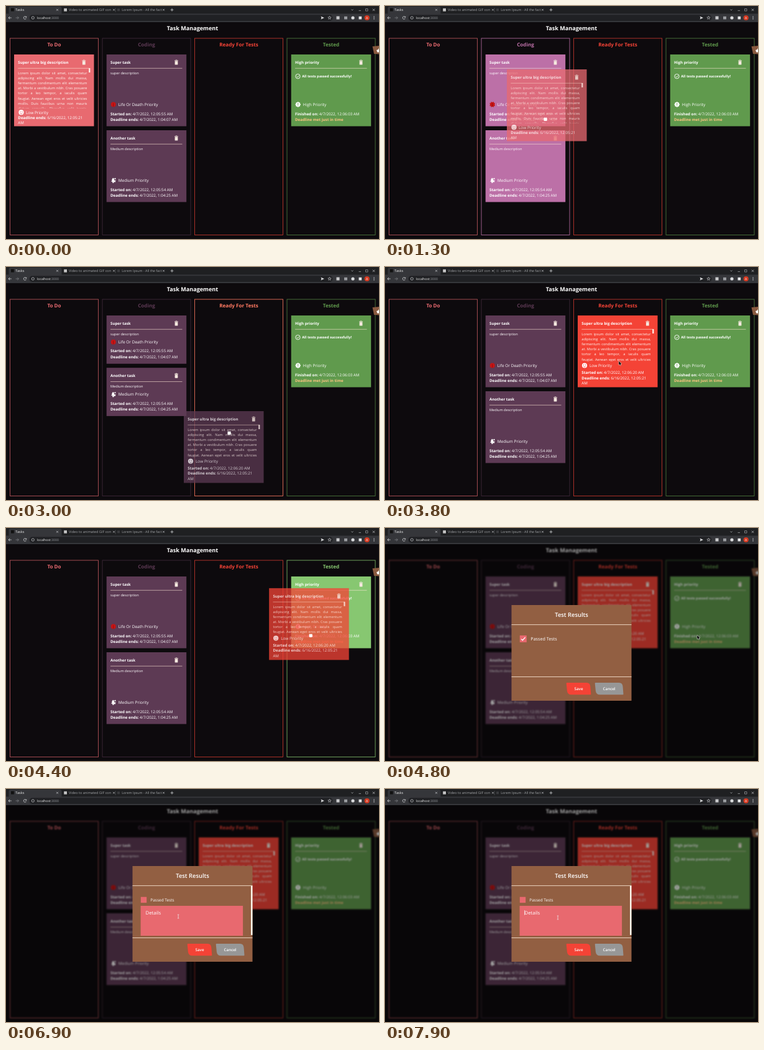
An HTML page with a canvas for the animation above (8 s loop, 600 by 375 pixels).

```html
<!DOCTYPE html>
<html lang="en">
<head>
<meta charset="utf-8">
<title>Tasks</title>
<style>
html, body { margin: 0; width: 100%; height: 100%; overflow: hidden; background: #0d0a0d; }
canvas { display: block; width: 600px; height: 375px; }
</style>
</head>
<body>
<canvas id="stage"></canvas>
<script>
const W = 600, H = 375, LOOP = 8000, BAR = 26;
const dpr = window.devicePixelRatio || 1;
const FONT = '"Open Sans", "Noto Sans", sans-serif';

function layer(canvas) {
  canvas.width = W * dpr;
  canvas.height = H * dpr;
  const c = canvas.getContext('2d');
  c.scale(dpr, dpr);
  if ('textRendering' in c) c.textRendering = 'geometricPrecision';
  return c;
}
const main = layer(document.getElementById('stage'));
const board = layer(document.createElement('canvas'));
let g = board;

const clamp = v => Math.max(0, Math.min(1, v));
const ramp = (t, a, b) => clamp((t - a) / (b - a));
const smooth = k => k * k * (3 - 2 * k);
const lerp = (a, b, k) => a + (b - a) * k;
const within = (t, a, b) => t >= a && t < b;
const mix = (a, b, k) => 'rgb(' + a.map((v, i) => Math.round(lerp(v, b[i], k))) + ')';

// Drawing helpers
function rect(x, y, w, h, color) {
  g.fillStyle = color;
  g.fillRect(x, y, w, h);
}
function text(s, x, y, size, color = '#fff', weight = 400, align = 'left') {
  g.font = `${weight} ${size}px ${FONT}`;
  g.textAlign = align;
  g.textBaseline = 'alphabetic';
  g.fillStyle = color;
  g.fillText(s, x, y);
  return g.measureText(s).width;
}
function disc(x, y, r, color) {
  g.fillStyle = color;
  g.beginPath();
  g.arc(x, y, r, 0, 7);
  g.fill();
}
function trace(pts, close) {
  g.beginPath();
  pts.forEach(([x, y], i) => i ? g.lineTo(x, y) : g.moveTo(x, y));
  if (close) g.closePath();
}
function line(pts, color, width = 0.8, close = false) {
  trace(pts, close);
  g.strokeStyle = color;
  g.lineWidth = width;
  g.stroke();
}
function poly(pts, color) {
  trace(pts, true);
  g.fillStyle = color;
  g.fill();
}
function ring(x, y, r, color, width = 0.8, from = 0, to = 7) {
  g.beginPath();
  g.arc(x, y, r, from, to);
  g.strokeStyle = color;
  g.lineWidth = width;
  g.stroke();
}
function pill(x, y, w, h, r, color) {
  g.fillStyle = color;
  g.beginPath();
  g.roundRect(x, y, w, h, r);
  g.fill();
}
function cross(x, y, r, color) {
  line([[x - r, y - r], [x + r, y + r]], color, 0.7);
  line([[x - r, y + r], [x + r, y - r]], color, 0.7);
}

// Board data
const COLUMNS = [
  { name: 'To Do', x: 6.5, base: [232, 106, 112], lit: [240, 116, 112] },
  { name: 'Coding', x: 155, base: [93, 58, 84], lit: [188, 112, 167] },
  { name: 'Ready For Tests', x: 303.5, base: [244, 67, 54], lit: [255, 122, 98] },
  { name: 'Tested', x: 452, base: [96, 154, 77], lit: [142, 207, 120] }
];
const LOREM = [
  'Lorem ipsum dolor sit amet, consectetur',
  'adipiscing elit. Nam mollis dui massa,',
  'fermentum condimentum elit elementum',
  'at. Morbi a vestibulum nibh. Cras posuere',
  'tortor a leo tempor, a iaculis quam',
  'feugiat. Aenean eget eros et velit ultricies',
  'mollis. Duis faucibus urna non mauris',
  'dictum convallis. Phasellus velit turpis,'
];
const SUPER = { title: 'Super task', desc: 'super description', level: 'Life Or Death',
  rows: [['Started on:', '4/7/2022, 12:05:55 AM'], ['Deadline ends:', '4/7/2022, 1:04:07 AM']] };
const ANOTHER = { title: 'Another task', desc: 'Medium description', level: 'Medium',
  rows: [['Started on:', '4/7/2022, 12:05:54 AM'], ['Deadline ends:', '4/7/2022, 1:04:25 AM']] };
const HIGH = { title: 'High priority', passed: true, level: 'High',
  rows: [['Finished on:', '4/7/2022, 12:06:03 AM']] };
const DUE = ['Deadline ends:', '6/16/2022, 12:05:21'];
const BIG_NEW = { title: 'Super ultra big description', long: true, level: 'Low', rows: [DUE] };
const BIG = { ...BIG_NEW, rows: [['Started on:', '4/7/2022, 12:06:20 AM'], DUE] };

function trash(x, y) {
  const c = '#f6e9df';
  rect(x - 2.9, y - 3.1, 5.8, 1.1, c);
  rect(x - 1.2, y - 4, 2.4, 1, c);
  pill(x - 2.4, y - 1.6, 4.8, 5.6, 0.7, c);
}
function badge(x, y, color) {
  g.fillStyle = color;
  g.beginPath();
  for (let i = 0; i <= 48; i++) {
    const a = i / 48 * Math.PI * 2, r = 4 + 0.35 * Math.cos(a * 8);
    g.lineTo(x + r * Math.cos(a), y + r * Math.sin(a));
  }
  g.fill();
}
function levelIcon(level, x, y, fill) {
  if (level === 'Low') {
    disc(x, y, 4.1, '#fff');
    disc(x - 1.5, y - 1, 0.7, fill);
    disc(x + 1.5, y - 1, 0.7, fill);
    ring(x, y + 0.3, 2, fill, 0.8, 0.3, 2.85);
  } else if (level === 'Medium') {
    poly([[x - 3.6, y + 2.2], [x - 2.3, y + 0.6], [x - 2.3, y - 1.6], [x - 0.6, y - 3.9],
      [x + 1.2, y - 2.4], [x + 1.3, y], [x + 3.8, y], [x + 3, y + 3.2], [x + 1, y + 2.6]], '#fff');
    disc(x - 0.3, y + 3.3, 1.2, '#fff');
    disc(x + 2.8, y - 2.6, 1.1, '#fff');
  } else if (level === 'High') {
    badge(x, y, '#fff');
    rect(x - 0.5, y - 2.3, 1, 2.9, fill);
    rect(x - 0.5, y + 1.3, 1, 1, fill);
  } else {
    for (let i = 0; i < 8; i++) {
      const a = i * Math.PI / 4 + 0.4;
      line([[x, y], [x + 4.7 * Math.cos(a), y + 4.7 * Math.sin(a)]], '#b01818', 1);
    }
    disc(x, y, 3.8, '#c81414');
    line([[x, y - 2], [x, y + 3.4]], '#6d0d12', 0.6);
  }
}
function justified(s, x, y, width, size) {
  const words = s.split(' ');
  g.font = `400 ${size}px ${FONT}`;
  const sizes = words.map(w => g.measureText(w).width);
  const gap = (width - sizes.reduce((a, b) => a + b, 0)) / (words.length - 1);
  words.forEach((w, i) => {
    text(w, x, y, size, '#fff4ee');
    x += sizes[i] + gap;
  });
}
function card(c, x, y, h, fill) {
  rect(x, y, 128.5, h, fill);
  const tx = x + 6.3;
  text(c.title, tx, y + 14.7, 6.15, '#fff', 700);
  trash(x + 112.3, y + 12.6);
  rect(tx, y + 21.8, 115.5, 0.8, 'rgba(255,232,215,.72)');

  const wraps = c.long, rows = c.rows;
  const low = wraps && rows.length === 1;
  if (c.long) {
    g.save();
    g.beginPath();
    g.rect(x, y + 23, 128, low ? 63.5 : 51);
    g.clip();
    LOREM.forEach((s, i) => justified(s, tx, y + 31.8 + i * 8.15, 111.2, 5.6));
    g.restore();
    rect(x + 120.2, y + 22, 2.2, 7, '#fff4ec');
  } else if (c.passed) {
    ring(x + 10.8, y + 35.2, 3.7, '#fff', 0.9);
    line([[x + 9, y + 35.3], [x + 10.4, y + 36.7], [x + 13, y + 33.8]], '#fff', 0.9);
    text('All tests passed successfully!', x + 17.5, y + 37.4, 5.6, '#fff', 700);
  } else {
    text(c.desc, tx, y + 31.8, 5.6);
  }

  const py = y + h - (low ? 22.3 : 35);
  levelIcon(c.level, x + (low ? 11.5 : 11), py, fill);
  text(c.level + ' Priority', x + 19, py + 2.4, 6.5);

  const first = low ? 11.2 : wraps ? 21.8 : h < 100 ? 18.4 : 18;
  const step = wraps ? 8.8 : 9.4;
  rows.forEach(([label, value], i) => {
    const ry = y + h - first + i * step;
    const w = text(label + ' ', tx, ry, 6.2, '#fff', 700);
    text(value, tx + w, ry, 6.2);
  });
  if (wraps) text('AM', tx, y + h - (low ? 3.4 : 4.8), 6.2);
  if (c.passed) text('Deadline met just in time', tx, y + h - 8.7, 6.15, '#fdc583', 700);
}

// Timeline: [time, x, y]
const PATH = [
  [100, 66, 146], [450, 75, 158], [1300, 258, 182], [1900, 230, 288], [2250, 235, 281],
  [2650, 235, 281], [3000, 359, 267], [3450, 382, 176], [3750, 377, 154], [4000, 377, 154],
  [4500, 503, 175], [4950, 503, 175], [5700, 266, 181], [6400, 266, 181], [7000, 278, 207],
  [8000, 278, 207]
];
const DRAGS = [
  { from: 500, to: 1980, task: BIG_NEW, col: 0, dx: 62, dy: 80 },
  { from: 2680, to: 3450, task: BIG, col: 1, dx: 73, dy: 35 },
  { from: 4000, to: 4560, task: BIG, col: 2, dx: 67, dy: 76 }
];
const LIT = [
  [[500, 800]],
  [[850, 1980], [2680, 2800]],
  [[2830, 3450], [4000, 4200]],
  [[4300, 4560]]
];
const MODAL = 4620, UNCHECK = 5890;

function pointer(t) {
  const i = PATH.findIndex(p => p[0] > t);
  if (i < 1) return null;
  const a = PATH[i - 1], b = PATH[i], k = smooth(ramp(t, a[0], b[0]));
  return [lerp(a[1], b[1], k), lerp(a[2], b[2], k)];
}
function glow(t, col) {
  return Math.max(...LIT[col].map(([a, b]) => ramp(t, a, a + 120) * (1 - ramp(t, b, b + 120))));
}

function drawBoard(t, pos) {
  g = board;
  rect(0, 0, W, H, '#0d0a0d');
  text('Task Management', 300, 39.2, 9.05, '#fff', 700, 'center');

  const fills = COLUMNS.map((c, i) => {
    const k = glow(t, i), fill = mix(c.base, c.lit, k);
    g.globalAlpha = lerp(i === 1 ? 0.62 : 0.75, 0.9, k);
    g.strokeStyle = fill;
    g.lineWidth = 0.9;
    g.strokeRect(c.x, 52, 142, 316.5);
    g.globalAlpha = 1;
    text(c.name, c.x + 71, 65.2, 8.1, fill, 700, 'center');
    return fill;
  });

  const drag = DRAGS.find(d => within(t, d.from, d.to));
  const three = within(t, 1980, 3450);
  const h = three ? 77.7 : 115.5;
  if (t < 500) card(BIG_NEW, 13, 78, 115.5, fills[0]);
  card(SUPER, 161.7, 78, h, fills[1]);
  card(ANOTHER, 161.7, 78 + h + 6.5, h, fills[1]);
  if (three && !drag) card(BIG, 161.7, 246.4, 115.5, fills[1]);
  if (t >= 3450 && !drag) card(BIG, 310, 78, 115.5, fills[2]);
  card(HIGH, 458.7, 78, 115.5, fills[3]);

  poly([[589.5, 65], [600, 64], [600, 77.5], [592, 77]], '#8a5a40');
  poly([[596, 71], [599, 69.7], [600, 67.5], [600, 74.5], [597.3, 74.5]], '#fff');

  if (drag) {
    g.globalAlpha = 0.76;
    card(drag.task, pos[0] - drag.dx, pos[1] - drag.dy, 115.5, mix(COLUMNS[drag.col].base, [0, 0, 0], 0));
    g.globalAlpha = 1;
  }
}

function browserBar() {
  const ink = '#d5d6d8', dim = '#a3a5a8';
  rect(0, 0, W, 13, '#1f2022');
  pill(4.5, 1, 85, 14, 3, '#35363a');
  rect(0, 12.3, W, BAR - 12.3, '#35363a');
  rect(8, 3.5, 4.8, 5, '#111');
  text('Tasks', 15.3, 8.3, 5.6, '#eee');
  cross(82.5, 6.2, 1.5, ink);
  rect(93.2, 3.8, 4.8, 4.8, '#c4c4c4');
  text('Video to animated GIF con', 101, 8.3, 5.55, dim);
  cross(173.5, 6.2, 1.4, ink);
  rect(175.8, 3, 0.6, 7, '#55575b');
  rect(179, 4.2, 4, 4, '#3a3b3e');
  text('Lorem Ipsum - All the fact', 186.3, 8.3, 5.4, dim);
  cross(253.5, 6.2, 1.4, ink);
  line([[264.6, 6.2], [269.4, 6.2]], ink);
  line([[267, 3.8], [267, 8.6]], ink);

  line([[555.4, 5.4], [557, 7], [558.6, 5.4]], dim);
  line([[567.5, 7.4], [571, 7.4]], dim);
  line([[578.5, 4.5], [582, 4.5], [582, 8], [578.5, 8]], dim, 0.7, true);
  cross(591.5, 6.2, 1.7, ink);

  line([[8.8, 19], [4, 19]], ink);
  line([[6.2, 16.8], [4, 19], [6.2, 21.2]], ink);
  line([[15.6, 19], [20.4, 19]], '#7d7f83');
  line([[18.2, 16.8], [20.4, 19], [18.2, 21.2]], '#7d7f83');
  ring(30.5, 19, 2.2, ink, 0.8, 0.4, 5.7);
  poly([[31, 18.4], [33.2, 18.4], [33.2, 16.2]], ink);

  pill(37.5, 14.2, 488, 9.8, 4.9, '#202124');
  ring(43.3, 19, 2.1, ink, 0.7);
  const w = text('localhost', 50, 20.9, 5.2, '#f0f0f0');
  text(':3000', 50 + w, 20.9, 5.2, '#9b9da1');
  poly([[506.5, 16.6], [512, 19], [506.5, 21.4], [507.4, 19]], ink);
  const star = [...Array(10)].map((_, i) => {
    const a = i * Math.PI / 5 - Math.PI / 2, r = i % 2 ? 1.2 : 2.8;
    return [520.5 + r * Math.cos(a), 19 + r * Math.sin(a)];
  });
  line(star, ink, 0.6, true);
  rect(531.5, 16.5, 5, 5, '#c9cacc');
  rect(544, 16.8, 5, 4.6, '#9a9ca0');
  disc(558, 19, 2.6, '#d9dadc');
  rect(567.5, 16.8, 4.6, 4.6, '#e4e5e7');
  disc(580.7, 19, 4.1, '#d63a22');
  text('A', 580.7, 20.9, 5, '#fff', 400, 'center');
  for (let i = -1; i < 2; i++) disc(592, 19 + i * 2, 0.65, ink);
}

function button(x, w, label, color) {
  const y = 249, h = 19.3;
  g.fillStyle = color;
  g.beginPath();
  g.moveTo(x + 1, y);
  g.lineTo(x + w - 7, y);
  g.quadraticCurveTo(x + w - 1.5, y, x + w - 1, y + 6);
  g.lineTo(x + w, y + h - 1);
  g.quadraticCurveTo(x + w, y + h, x + w - 1, y + h);
  g.lineTo(x + 8, y + h);
  g.quadraticCurveTo(x + 2, y + h, x + 1.2, y + h - 6);
  g.lineTo(x, y + 1);
  g.quadraticCurveTo(x, y, x + 1, y);
  g.fill();
  text(label, x + w / 2, 261, 6.25, '#fff', 600, 'center');
}

function drawModal(t) {
  const pink = '#e8696f', cream = '#f5dfcc';
  const k = smooth(ramp(t, UNCHECK, 6260));
  rect(203.5, 124, 193, 154, '#925f42');
  text('Test Results', 300, 142.9, 9.4, '#fff', 600, 'center');
  rect(203.5, 155.2, 193, 0.9, cream);
  rect(203.5, 239, 193, 0.9, cream);

  const size = lerp(11, 9.4, k);
  rect(216.8, 178.4 - size / 2, size, size, pink);
  if (t < UNCHECK) line([[219.2, 178.6], [221.3, 180.8], [225.6, 175.9]], '#fff', 1.3);
  text('Passed Tests', lerp(234.3, 232.3, k), lerp(181, 180.5, k), lerp(7.2, 6.5, k));

  if (k > 0) {
    const top = 207.5 - 19.5 * k, h = 48.2 * k, w = lerp(168, 164.5, k);
    rect(216.6, top, w, h, pink);
    g.save();
    g.beginPath();
    g.rect(216.6, top, w, h);
    g.clip();
    text('Details', 224.6, top + lerp(0, 13.6, k), 7.7, '#fff');
    g.restore();
    if (t > 7150 && (t - 7150) % 1000 < 800) rect(224.2, 195, 0.6, 8, '#fff');
  }
  if (k > 0.85) rect(394, 156, 2.5, 79, '#fff5ec');
  button(291.7, 39.6, 'Save', '#f44336');
  button(337.7, 45.8, 'Cancel', '#979797');
}

function drawPointer(t, [x, y]) {
  const dragging = DRAGS.some(d => within(t, d.from, d.to));
  if (dragging) {
    pill(x - 2.6, y - 1.6, 5.4, 4.6, 1.6, '#fff');
    for (let i = 0; i < 3; i++) disc(x - 1.7 + i * 1.7, y - 1.5, 0.9, '#fff');
  } else if (t > 6750) {
    line([[x - 1.3, y - 3], [x + 1.3, y - 3]], '#eee', 0.6);
    line([[x, y - 3], [x, y + 3]], '#eee', 0.7);
    line([[x - 1.3, y + 3], [x + 1.3, y + 3]], '#eee', 0.6);
  } else {
    const p = [[0, -2.5], [0, 3.6], [1.4, 2.4], [2.4, 4.5], [3.4, 4], [2.5, 2], [4.2, 1.7]]
      .map(([a, b]) => [x + a - 0.8, y + b]);
    line(p, '#fff', 0.9, true);
    poly(p, '#111');
  }
}

function frame(now) {
  const t = now % LOOP, pos = pointer(t);
  drawBoard(t, pos);
  g = main;
  const veil = ramp(t, MODAL, MODAL + 130);
  g.save();
  g.beginPath();
  g.rect(0, BAR, W, H - BAR);
  g.clip();
  if (veil > 0) g.filter = `blur(${0.9 * veil * dpr}px)`;
  g.drawImage(board.canvas, 0, 0, W, H);
  g.filter = 'none';
  rect(0, BAR, W, H, `rgba(0,0,0,${0.36 * veil})`);
  g.restore();
  browserBar();
  if (veil > 0) {
    g.globalAlpha = veil;
    drawModal(t);
    g.globalAlpha = 1;
  }
  if (pos) drawPointer(t, pos);
}

const start = performance.now();
function tick() {
  frame(performance.now() - start);
  requestAnimationFrame(tick);
}
tick();
</script>
</body>
</html>
```
